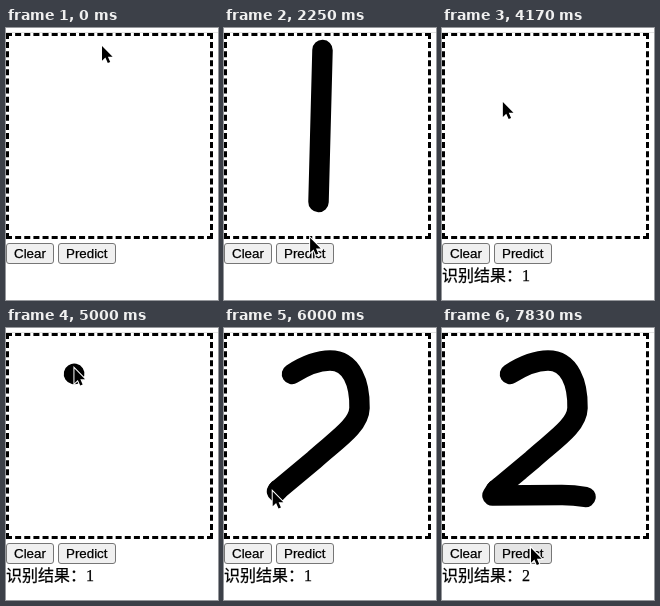
These frames come from a looping animation (212 by 272 pixels, 8000 ms). An HTML page:

```html
<!DOCTYPE html>
<html lang="zh">
<head>
<meta charset="utf-8">
<style>
html, body { margin: 0; width: 100%; height: 100%; overflow: hidden; background: #fff; }
#pad { position: absolute; left: 0; top: 5px; width: 207px; height: 206px; box-sizing: border-box; border: 3px dashed #000; }
svg { position: absolute; left: 0; top: 0; }
text { stroke: #000; stroke-width: .25; }
.button rect { stroke: #767676; }
.button text { font: 13.333px "Liberation Sans", Arial, sans-serif; }
#result { font: 16px "Liberation Serif", "Noto Sans CJK SC", "Noto Sans CJK", serif; }
.ink { fill: none; stroke: #000; stroke-width: 20.5; stroke-linecap: round; stroke-linejoin: round; }
#cursor { stroke: #fff; stroke-width: 2; paint-order: stroke; }
</style>
</head>
<body>
<div id="pad"></div>
<svg width="212" height="272" viewBox="0 0 212 272">
  <path d="M0 4.5H212" stroke="#e2e2e2"/>
  <path class="ink" id="one" pathLength="1" d="M98.5 22L94.5 174"/>
  <path class="ink" id="hook" pathLength="1" d="M68 46C82 37 94 32.5 106 32.5C128 32.5 136 56 135.5 80C135 98 112 112 90 132L54 162"/>
  <path class="ink" id="base" pathLength="1" d="M54 162L50.5 167.5L120 167Q132 167 143.5 169"/>
  <g class="button">
    <rect id="clear" x=".5" y="215.5" width="47" height="20" rx="2.5"/>
    <text x="8" y="230">Clear</text>
  </g>
  <g class="button">
    <rect id="predict" x="52.5" y="215.5" width="57" height="20" rx="2.5"/>
    <text x="60" y="230">Predict</text>
  </g>
  <text id="result" x="0" y="253"></text>
  <path id="cursor" d="M0 0V14.8L3.4 11.6L5.8 17L8.2 16L5.9 10.7H10.6Z"/>
</svg>
<script>
const LOOP = 8000, STEP = 1000 / 12, LEAD = 50, CLEARED = 3830;
const $ = id => document.getElementById(id);

// The pointer either draws a stroke or hops to a point.
const actions = [
  { from: 750, to: 2000, stroke: $("one"), gone: CLEARED },
  { from: 2083, to: 2417, goal: [84, 223] },
  { from: 3167, to: 3583, goal: [29, 222] },
  { from: 3833, to: 4417, goal: [68, 41] },
  { from: 5000, to: 5750, stroke: $("hook"), gone: LOOP },
  { from: 5950, to: 6583, stroke: $("base"), gone: LOOP },
  { from: 6667, to: 7250, goal: [89, 220] }
];

const progress = (a, t) => Math.min(1, Math.max(0, (t - a.from) / (a.to - a.from)));
const smooth = p => p * p * (3 - 2 * p);
const easeOut = p => p * (2 - p);
const during = (t, start) => t >= start && t < start + 80;

// The pointer runs slightly ahead of the ink.
function pointer(t) {
  let pos = [96, 18];
  for (const a of actions) {
    if (t < a.from) break;
    if (a.stroke) {
      const p = smooth(progress(a, t + LEAD));
      const tip = a.stroke.getPointAtLength(p * a.stroke.getTotalLength());
      pos = [tip.x - 2, tip.y - 4];
    } else {
      const p = easeOut(progress(a, t));
      pos = pos.map((v, i) => v + (a.goal[i] - v) * p);
    }
  }
  return pos;
}

function drawInk(t) {
  for (const a of actions.filter(a => a.stroke)) {
    const shown = t >= a.from && t < a.gone;
    a.stroke.style.visibility = shown ? "visible" : "hidden";
    a.stroke.style.strokeDasharray = `${Math.max(.001, smooth(progress(a, t)))} 2`;
  }
}

function paintButton(id, [x, y], pressed) {
  const { x: left, y: top, width, height } = $(id).getBBox();
  const hover = x >= left && x < left + width && y >= top && y < top + height;
  $(id).setAttribute("fill", pressed ? "#f5f5f5" : hover ? "#e5e5e5" : "#f0f0f0");
}

function draw(now) {
  const t = Math.floor((now % LOOP + 5) / STEP) * STEP + 0.5;
  const pos = pointer(t);
  $("cursor").setAttribute("transform", `translate(${pos})`);
  drawInk(t);
  paintButton("clear", pos, during(t, 3750));
  paintButton("predict", pos, during(t, 2750) || during(t, 7500));
  $("result").textContent = t < 2830 ? "" : "识别结果：" + (t < 7580 ? 1 : 2);
}

const start = performance.now();
function frame() {
  draw(performance.now() - start);
  requestAnimationFrame(frame);
}
frame();
</script>
</body>
</html>
```
